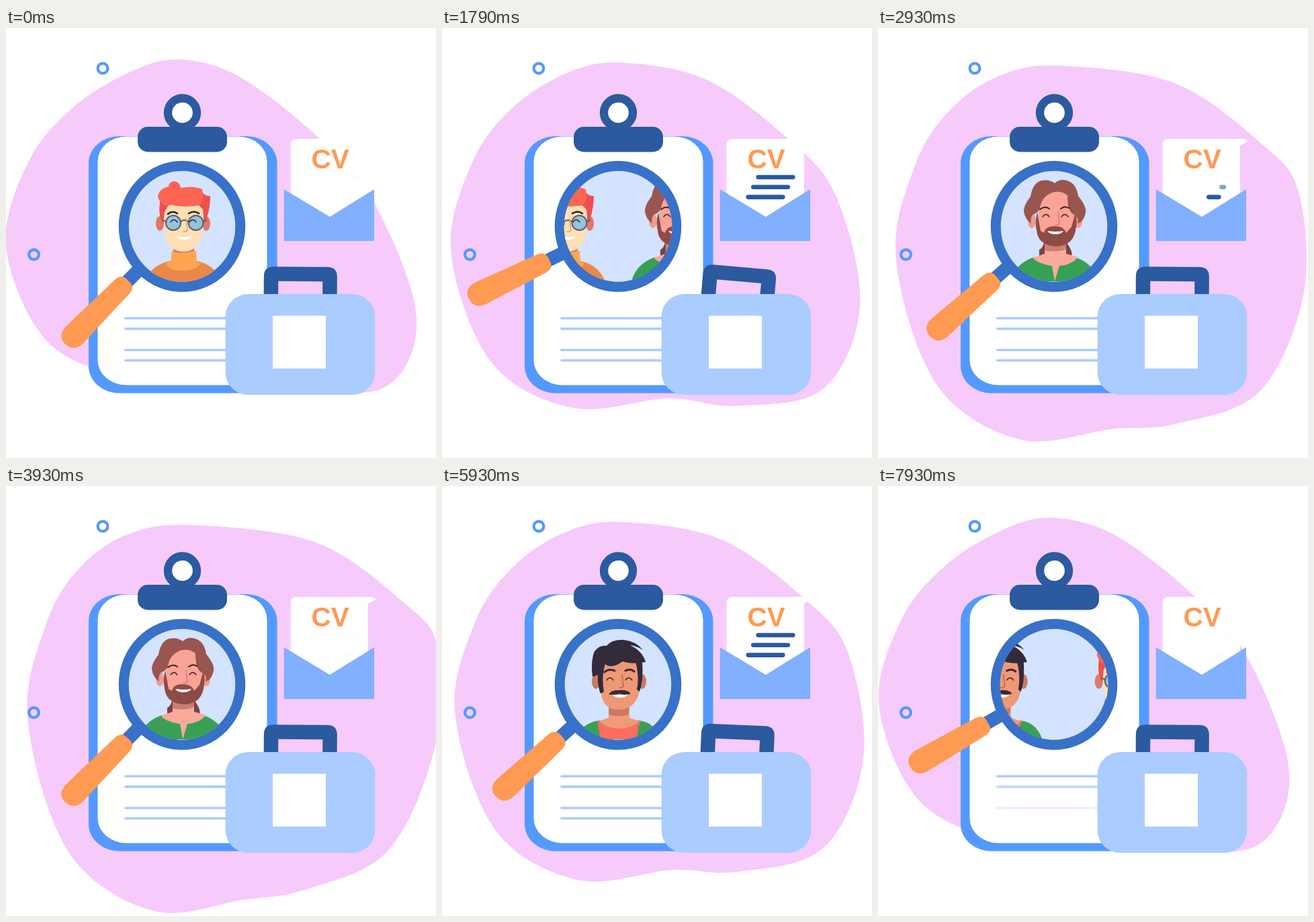
Recreate the animation shown at these times as an HTML page. Size 640 by 640 pixels, loop 8000 ms.

```html
<!DOCTYPE html>
<html lang="en">
<head>
<meta charset="utf-8">
<title>CV search</title>
<style>
  html, body { margin: 0; width: 100%; height: 100%; overflow: hidden; background: #fff; }
  svg { display: block; width: 100vw; height: 100vh; }
  .line { fill: none; stroke-linecap: round; stroke-linejoin: round; }
</style>
</head>
<body>
<svg viewBox="0 0 640 640">
  <defs>
    <clipPath id="lens"><ellipse cx="262" cy="295.3" rx="80.5" ry="82.5"/></clipPath>
    <g id="ears"><ellipse cx="229" cy="291" rx="6" ry="11"/><ellipse cx="298" cy="291" rx="6" ry="11"/></g>
    <path id="eyes" class="line" stroke="#332530" stroke-width="1.3" d="M245 289q5-7 10 0m18 0q5-7 10 0"/>
    <path id="nose" class="line" stroke-width="1.5" d="M268 279l2 17q-2 3-6 2"/>
    <path id="smile" fill="#fff" d="M253 310q12 2 24 0q-3 5-12 5t-12-5"/>
  </defs>

  <path id="blob" fill="#f6cbfc"/>
  <g fill="none" stroke="#5499ff" stroke-width="4.2">
    <circle cx="144" cy="60" r="7.4"/>
    <circle cx="41.5" cy="337.3" r="7.4"/>
  </g>

  <!-- clipboard -->
  <rect x="123" y="161" width="280.5" height="382.5" rx="46" ry="40" fill="#5499ff"/>
  <rect x="136.5" y="161.5" width="252" height="370" rx="43" ry="37" fill="#fff"/>
  <g id="rows" class="line" stroke="#aaccff" stroke-width="3.6"></g>
  <rect x="196" y="147" width="133" height="37.5" rx="15" fill="#2b5a9e"/>
  <circle cx="262.5" cy="126" r="21.5" fill="#fff" stroke="#2b5a9e" stroke-width="12.3"/>

  <!-- magnifier -->
  <g id="grip">
    <path stroke="#3871c8" stroke-width="20" d="M92 0H125"/>
    <path fill="#ff9a52" d="M126-15Q114-14 114-4V5Q115 14 126 15L228 18Q247 17 247 0T228-18Z"/>
  </g>
  <ellipse cx="262" cy="295.3" rx="86.8" ry="90" fill="#d4e3ff" stroke="#3871c8" stroke-width="15"/>
  <g clip-path="url(#lens)">
    <g class="person">
      <path fill="#eb8748" d="M203 386Q211 353 247 346H281Q315 352 324 386Z"/>
      <path fill="#ffa552" d="M247 332H283L284 348L290 350Q286 360 264 361T238 350L245 347Z"/>
      <path fill="#e0786c" d="M249 326H280V332Q265 337 249 333Z"/>
      <use href="#ears" fill="#e0786c"/>
      <path fill="#fde0b5" d="M234 260L236 302Q239 332 264 333Q289 332 293 302L296 260Q265 245 234 260Z"/>
      <path fill="#f04f4f" d="M230 254Q225 278 234 292L236 274L244 260ZM289 239Q294 251 304 250Q304 274 295 291L293 270L285 262Z"/>
      <path fill="#ff6552" d="M226 252Q227 239 242 236Q243 228 251 228Q259 230 260 238Q278 234 292 240Q296 256 287 264Q262 268 246 263Q232 268 226 252Z"/>
      <g class="line" stroke="#6a5a68" stroke-width="2">
        <path stroke="#2b2029" stroke-width="2.5" d="M241 277q6-6 14-1m17 0q8-5 15 0"/>
        <g fill="#92c5dd"><circle cx="249" cy="290" r="11"/><circle cx="282.5" cy="290" r="11"/></g>
        <path d="M260 288q5.5-4 11 0M233 286l5 2M294 288l4-2"/>
      </g>
      <use href="#eyes"/>
      <use href="#nose" stroke="#e09a80" y="5"/>
      <use href="#smile"/>
    </g>

    <g class="person">
      <path fill="#7d4240" d="M249 312Q246 328 240 330V341H250L256 326ZM278 316Q291 332 288 340H280L274 326Z"/>
      <path fill="#37a055" d="M197 377Q204 351 232 341H293Q321 350 328 377Z"/>
      <path fill="#fba99a" d="M230 342L248 336V322H280V336L298 341Q288 353 270 354L263 377L259 354Q238 351 230 342Z"/>
      <path fill="#c97f75" d="M248 318H280V329Q266 335 248 331Z"/>
      <use href="#ears" fill="#f09a8e" y="-4"/>
      <path fill="#fba396" d="M238 250Q264 232 292 250V295Q288 319 264 320T239 295Z"/>
      <path fill="#8f4b46" d="M237 274L242 302L247 305Q249 295 263 295T280 305L288 296L294 274Q297 288 294 302Q289 325 264 325Q238 323 236 301Q233 290 237 274Z"/>
      <path fill="#99564f" d="M263 231Q273 222 286 229Q296 235 298 250Q311 266 309 275Q306 289 297 291Q300 281 290 277Q282 271 282 249Q272 241 259 245Q244 252 242 264Q240 275 230 278Q226 284 228 291Q219 285 217 273Q217 263 227 251Q230 231 243 227Q256 225 263 231Z"/>
      <g class="line" stroke="#3a2428">
        <path stroke-width="2" d="M241 270q7-6 14-1m17 0q6-5 12-1"/>
        <path stroke="#7d4240" stroke-width="1.2" d="M284 262q2 12 7 10"/>
      </g>
      <use href="#eyes" y="-8"/>
      <use href="#nose" stroke="#d67d72" y="-5"/>
      <use href="#smile" x="-1" y="-8"/>
    </g>

    <g class="person">
      <path fill="#37a055" d="M198 377Q209 352 234 349H293Q316 351 326 377Z"/>
      <path fill="#ff6d5c" d="M231 350H296Q290 359 291 377H236Z"/>
      <path fill="#f09a7a" d="M234 350L248 345V326H279V345L294 350Q282 361 264 361T234 350Z"/>
      <path fill="#c97a63" d="M249 328H279L277 340Q264 345 248 340Z"/>
      <use href="#ears" fill="#c97a63"/>
      <path fill="#ee9876" d="M235 258H294V304Q289 332 264 333T236 304Z"/>
      <path fill="#332a3a" d="M224 284Q221 260 227 246Q235 236 245 238Q253 228 270 229Q289 231 299 244Q290 238 280 237Q299 246 303 262Q282 266 269 261Q252 273 243 265Q237 285 241 306L236 309Q231 296 232 281ZM288 261H298Q300 290 294 306L290 303Q294 284 288 261Z"/>
      <path class="line" stroke="#332a3a" stroke-width="3" d="M242 277q6-6 15-2m16 0q7-4 13 1"/>
      <use href="#eyes"/>
      <use href="#nose" stroke="#b86650" y="2"/>
      <use href="#smile"/>
      <path fill="#332a3a" d="M248 310Q253 303 264 304Q276 303 281 309Q273 312 264 309Q256 312 248 310Z"/>
    </g>
  </g>

  <!-- briefcase -->
  <path id="strap" fill="#2b5a9e" d="M383.5 415V370Q383.5 355.5 398 355.5H478Q492.5 355.500 492.500 370V415H471V377H405V415Z"/>
  <rect x="326.7" y="396" width="222.5" height="150" rx="34" ry="33" fill="#aaccff"/>
  <rect x="397" y="428.3" width="79" height="78.500" fill="#fff"/>

  <!-- letter -->
  <path fill="#fff" d="M423.5 260V174Q423.5 165 433 165H545L551 168.500L538.7 175V260L482 290Z"/>
  <text x="454.5" y="208.600" font-family="'Liberation Sans', Arial, sans-serif" font-weight="700" font-size="40.500" fill="#ff9a52">CV</text>
  <g id="strokes" class="line" stroke="#2b5a9e" stroke-width="6.6"></g>
  <path fill="#80b0ff" d="M413.7 240L482 281L548 240V317H413.7Z"/>
</svg>

<script>
const LOOP = 8000;
const $ = id => document.getElementById(id);
const clamp = x => Math.max(0, Math.min(1, x));
const ease = x => x * x * (3 - 2 * x);
const ramp = (t, start, length) => ease(clamp((t - start) / length));

function addLines(id, count) {
  return Array.from({ length: count }, () =>
    $(id).appendChild(document.createElementNS('http://www.w3.org/2000/svg', 'path')));
}
const rows = addLines('rows', 4);
const strokes = addLines('strokes', 3);
const people = document.querySelectorAll('.person');

// Key points of the blob: x, y when small, then x, y when grown
const outline = [
  [262, 47, 275, 57], [350, 74, 450, 83], [465, 163, 580, 173], [548, 260, 633, 243],
  [611, 430, 635, 395], [565, 534, 568, 542], [430, 535, 445, 594], [325, 505, 350, 605],
  [180, 518, 215, 621], [60, 465, 90, 537], [0, 325, 29, 345], [33, 200, 57, 205],
  [100, 118, 108, 122], [190, 63, 182, 71]
];

function drawBlob(t) {
  const grown = 1.11 * (ramp(t, 60, 3900) - ramp(t, 3960, 4550));
  const points = outline.map(([a, b, c, d]) => [a + (c - a) * grown, b + (d - b) * grown]);
  const n = points.length, at = i => points[(i + n) % n];
  const handle = (i, sign) => [0, 1].map(k => at(i)[k] + sign * (at(i + 1)[k] - at(i - 1)[k]) / 6);
  const curves = points.map((_, i) => `C${handle(i, 1)} ${handle(i + 1, -1)} ${at(i + 1)}`);
  $('blob').setAttribute('d', 'M' + points[0] + curves.join(''));
}

// One person slides out to the left while the next one slides in
function drawPeople(t) {
  const x = [0, 400, 400];
  [163, 190, 181].forEach((gap, i) => {
    const start = 1305 + 3080 * i;
    if (t < start) return;
    x[i] = -gap * ramp(t, start, 1000);
    x[(i + 1) % 3] = gap + x[i];
  });
  people.forEach((person, i) => person.setAttribute('transform', `translate(${x[i]} 0)`));
}

function drawRows(t) {
  rows.forEach((row, i) => {
    row.setAttribute('d', `M178 ${432 + 15.6 * (i % 2) + 47.2 * (i >> 1)}H340`);
    row.style.opacity = 1 - ramp(t, 6580 + 130 * i, 400) + ramp(t, 7540 + 122 * i, 400);
  });
}

function drawStrokes(t) {
  const u = t % 4000;
  strokes.forEach((line, i) => {
    const size = ramp(u, 100 + 300 * i, 1000) - ramp(u, 2514 + 80 * i, 400);
    line.setAttribute('d', `M${522.3 - 7.5 * i} ${222 + 14.8 * i}h${-51.5 * size - .01}`);
    line.style.opacity = .025 + .975 * clamp(size / .12);
  });
}

function drawGrip(t) {
  const u = t % 5400;
  const angle = 45.3 - 19.3 * (ramp(u, 200, 1400) - ramp(u, 2250, 950));
  $('grip').setAttribute('transform', `translate(262 295) rotate(${180 - angle})`);
}

function drawStrap(t) {
  const angle = .3 + 4.8 * Math.exp(-(((t % 4000 - 1750) / 200) ** 2));
  $('strap').setAttribute('transform', `rotate(${angle} 438 425)`);
}

function draw() {
  const t = performance.now() % LOOP;
  [drawBlob, drawPeople, drawRows, drawStrokes, drawGrip, drawStrap].forEach(part => part(t));
  requestAnimationFrame(draw);
}
draw();
</script>
</body>
</html>
```
